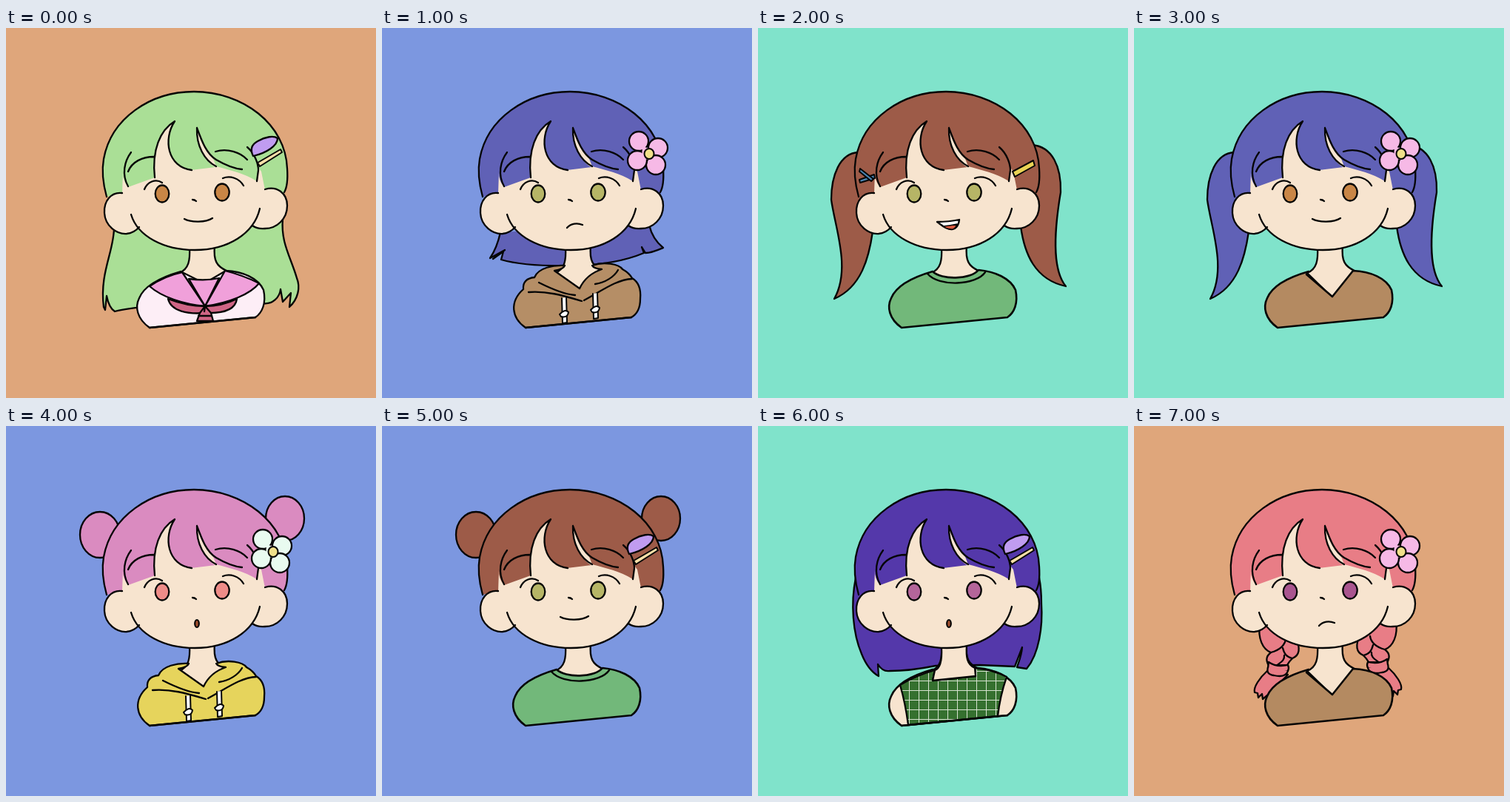
Recreate the animation shown at these times as an HTML page. Size 500 by 500 pixels, loop 8 s.

```html
<!DOCTYPE html>
<html lang="en">
<head>
<meta charset="utf-8">
<title>Character mixer</title>
<style>
html, body { margin: 0; width: 100%; height: 100%; overflow: hidden; }
svg { display: block; width: 100vw; height: 100vh; }
</style>
</head>
<body>
<svg id="stage" viewBox="0 0 500 500" fill="none" stroke-linecap="round" stroke-linejoin="round"></svg>
<script>
const SKIN = '#f7e4cf', INK = '#050505';
const ORANGE = '#dfa67b', BLUE = '#7c97e0', TEAL = '#80e3cb';

const shape = (d, fill = 'none', width = 2.3) =>
  `<path d="${d}" fill="${fill}" stroke="${width ? INK : 'none'}" stroke-width="${width}"/>`;
const oval = (x, y, rx, ry, fill, width = 2.3) =>
  `<ellipse cx="${x}" cy="${y}" rx="${rx}" ry="${ry}" fill="${fill}" stroke="${INK}" stroke-width="${width}"/>`;
const group = (transform, content) => `<g transform="${transform}">${content}</g>`;

// Hair behind the head
const backHair = {
  long: c => shape('M146 268C147 300 126 330 132 377L134 381L136 362C138 372 142 380 147 383C162 379 174 379 186 376L347 372C360 374 370 364 371 353L374 370L385 358L383 377C395 366 398 350 393 338C385 310 371 290 374 258', c),
  flip: c => shape('M160 276C157 290 152 302 146 311L166 300L150 312L164 302L161 313C185 320 225 322 262 321C300 320 330 314 354 304L351 296L356 304C364 304 373 300 380 297C370 289 364 279 361 266', c),
  bob: c => shape('M132 205C125 240 128 280 140 308C146 323 154 333 163 338L162 322C167 330 172 332 178 331C200 331 220 328 240 324L300 323L347 325L357 299C356 312 352 319 350 326L363 328C380 308 385 270 383 240C383 225 382 215 380 205', c),
  pigtails: c => shape('M136 168C110 169 99 200 99 232C104 270 126 325 103 366C140 350 150 310 155 275L160 215Z', c) +
    shape('M370 158C398 160 410 188 409 222C401 270 396 325 416 349C374 340 360 305 355 268L350 215Z', c),
  buns: c => oval(127, 147, 27, 31, c) + oval(377, 125, 26, 30, c),
  braids: c => {
    const braid = shape('M180 331C170 340 161 353 163 360L167 361L168 367L173 362L174 369L180 364L208 336Z', c) +
      shape('M170 268C167 287 174 302 185 306C177 312 179 318 182 324L207 323Q209 319 214 314C224 310 225 300 219 288L200 270Z', c) +
      shape('M185 306C197 303 204 296 205 288M201 300C203 308 206 312 214 314M203 310C204 318 196 320 190 326') +
      shape('M182 319C189 324 199 325 208 323Q210 327 208 331C199 333 188 332 181 327Z', c) +
      shape('M181 326C179 333 182 336 189 337C198 339 206 338 208 331', c);
    return braid + group('translate(524 -4) scale(-1 1)', braid);
  }
};

const neck = shape('M248 296C249 314 247 326 234 331L268 364L298 328C285 322 280 315 282 294', SKIN);
const torso = 'M194 405C177 393 174 377 180 365C187 348 208 337 236 329';
const rightSide = 'C320 329 341 338 348 354C352 372 346 385 337 391Z';

const lace = (x, y) =>
  shape(`M${x - 3} ${y - 22}L${x - 2} ${y + 12}L${x + 4} ${y + 11}L${x + 3} ${y - 23}`, '#fff', 2) +
  shape(`M${x - 6} ${y}Q${x + 1} ${y - 8} ${x + 6} ${y - 3}Q${x + 5} ${y + 5} ${x - 4} ${y + 3}Z`, '#fff', 2);

const outfits = {
  sailor: c => shape(torso + 'L268 345L297 328' + rightSide, '#fdeef6') +
    shape('M247 339Q270 342 288 338L269 376Z', c) +
    shape('M238 330L269 376C240 373 211 364 194 349Q214 335 238 330Z', c) +
    shape('M296 328L269 376C302 371 330 360 342 345Q320 334 296 328Z', c) +
    shape('M219 366C223 383 246 387 269 385C294 386 310 381 312 366Q292 376 269 376Q244 376 219 366Z', '#cf6585') +
    shape('M269 376L262 385L258 396L280 396L277 385Z', '#cf6585') +
    shape('M260 389L278 389M269 376L268 383') +
    shape('M194 405L337 391'),
  hoodie: c => shape('M194 405C175 392 172 370 191 353C190 343 196 338 206 337C211 324 232 320 247 321Q245 326 233 328L267 352Q276 333 297 326Q286 325 284 321C300 315 320 319 325 326Q334 331 338 338C348 344 350 355 349 366C349 379 344 387 337 391Z', c) +
    shape('M198 357C224 355 246 362 270 369M273 368C296 356 316 340 338 339M212 344C228 352 246 360 261 361M288 346C302 344 314 336 319 327') +
    lace(246, 387) + lace(288, 381) + shape('M194 405L337 391'),
  tee: c => shape(torso + 'C248 341 287 340 298 327' + rightSide, c, 2.6) +
    shape('M229 332C244 350 295 348 307 330'),
  vneck: c => shape(torso + 'L233 333L268 363L296 328' + rightSide, c, 2.6),
  vest: c => shape(torso + 'L297 327' + rightSide, SKIN, 2.6) +
    `<pattern id="grid" x="191" y="344" width="13" height="13" patternUnits="userSpaceOnUse">
      <path d="M0 0H13V13H0Z" fill="${c}"/><path d="M0 .5H13M.5 0V13" stroke="#d5e2cf"/></pattern>` +
    shape('M192 350Q214 337 239 330L236 344L294 338L293 327Q317 329 336 339Q327 365 324 392L203 404Q199 374 192 350Z', 'url(#grid)') +
    shape('M248 300C249 320 245 328 239 330L236 344L294 338L293 327C282 322 281 312 282 296', SKIN) +
    shape('M194 405L337 391')
};

const faceFill = shape('M155 190L200 115L300 125L345 185L352 218L343 244C335 278 300 300 255 300C214 300 178 282 169 252L155 223Z', SKIN, 0);
const ears = shape('M157 223C142 221 132 234 133 250C134 268 150 279 163 278Q173 277 180 269', SKIN) +
  shape('M350 218C366 213 380 223 380 240C380 258 366 271 350 271Q340 272 333 267', SKIN);
const chin = shape('M169 252C178 282 214 300 255 300C300 300 335 278 343 244');

const fringe = c =>
  shape('M136 228C131 210 129 194 132 177C142 122 195 86 254 86C320 86 378 130 380 190C381 205 380 215 376 224L350 219L345 194L342 190L339 207C322 196 302 192 284 187C268 178 258 160 258 135C259 160 270 182 283 188L250 192C220 190 212 150 228 126C208 138 197 165 201 202L165 215Q157 206 158 194L157 224Z', c, 0) +
  shape('M258 136C258 158 267 178 284 187L279 174C269 165 262 152 258 136Z', SKIN, 0) +
  shape('M136 228C131 210 129 194 132 177C142 122 195 86 254 86C320 86 378 130 380 190C381 205 380 215 376 222') +
  shape('M169 168C160 180 156 198 165 214M165 194C170 181 184 174 200 174M201 202C197 165 208 138 228 126C212 150 218 188 251 192M258 135C257 159 268 179 284 187M258 135C265 154 271 170 284 178C296 185 308 190 319 191M283 167C299 162 317 168 326 178M326 161C337 170 341 185 341 192L339 207');

const flower = c =>
  [[347, 153], [373, 162], [370, 185], [345, 179]].map(([x, y]) => oval(x, y, 13, 13, c)).join('') +
  shape('M352 160L368 165L366 178L351 177Z', c, 0) + oval(361, 170, 6.5, 7, '#f0e08a', 2);
const barrette = c =>
  shape('M334 173C330 165 331 158 340 153C350 147 362 145 367 149C367 159 352 169 334 173Z', c) +
  shape('M340 182L371 164L373 168L343 187Z', '#f6dfa8', 2);
const clips = c =>
  shape('M344 194L372 179L374 186L347 201Z', c, 2) +
  shape('M137 205L157 198L158 203L138 209Z', '#4b86b4', 2) +
  shape('M138 190L156 204L153 207L137 194Z', '#4b86b4', 2);

const mouths = {
  smile: shape('M241 258C250 263 270 263 279 257'),
  frown: shape('M250 270C255 264 264 263 271 266'),
  oh: oval(258, 267, 2.8, 5, '#a4502f', 2.2),
  laugh: shape('M242 262Q258 262 272 259C271 268 266 273 261 272C253 272 248 266 242 262Z', '#fff') +
    shape('M250 268Q260 267 269 265Q266 273 261 272Q254 271 250 268Z', '#dc5a40', 1.4)
};

const features = eye =>
  oval(211, 224, 9.3, 11.5, eye) + oval(292, 222, 9.7, 11.5, eye) +
  shape('M187 218C191 208 202 203 211 209M293 203C303 199 315 203 321 213M252 232Q255 232 257 234');

// background, hair style, hair, outfit, cloth, eyes, mouth, accessory
const looks = [
  [ORANGE, 'long', '#aadf96', 'sailor', '#f0a0da', '#c98646', 'smile', barrette('#c09cf0')],
  [BLUE, 'flip', '#6061b6', 'hoodie', '#b58e66', '#b6b566', 'frown', flower('#f6b9e6')],
  [TEAL, 'pigtails', '#9d5b48', 'tee', '#72b87a', '#b6b566', 'laugh', clips('#ead355')],
  [TEAL, 'pigtails', '#6061b6', 'vneck', '#b48a61', '#c98646', 'smile', flower('#f6b9e6')],
  [BLUE, 'buns', '#da8bc0', 'hoodie', '#e6d45c', '#ee8c88', 'oh', flower('#e9fbf0')],
  [BLUE, 'buns', '#9d5b48', 'tee', '#72b87a', '#b6b566', 'smile', barrette('#c09cf0')],
  [TEAL, 'bob', '#5438aa', 'vest', '#35702f', '#b4659a', 'oh', barrette('#c09cf0')],
  [ORANGE, 'braids', '#e87d86', 'vneck', '#b48a61', '#a9558f', 'frown', flower('#f6b9e6')]
];

const draw = ([bg, style, hair, outfit, cloth, eye, mouth, extra]) =>
  `<path d="M0 0H500V500H0Z" fill="${bg}"/>` + backHair[style](hair) + neck +
  outfits[outfit](cloth) + faceFill + fringe(hair) + ears + chin +
  features(eye) + mouths[mouth] + extra;

const stage = document.getElementById('stage');
let shown = -1;
function tick() {
  const current = Math.floor(performance.now() / 1000) % looks.length;
  if (current !== shown) stage.innerHTML = draw(looks[shown = current]);
  requestAnimationFrame(tick);
}
tick();
</script>
</body>
</html>
```
